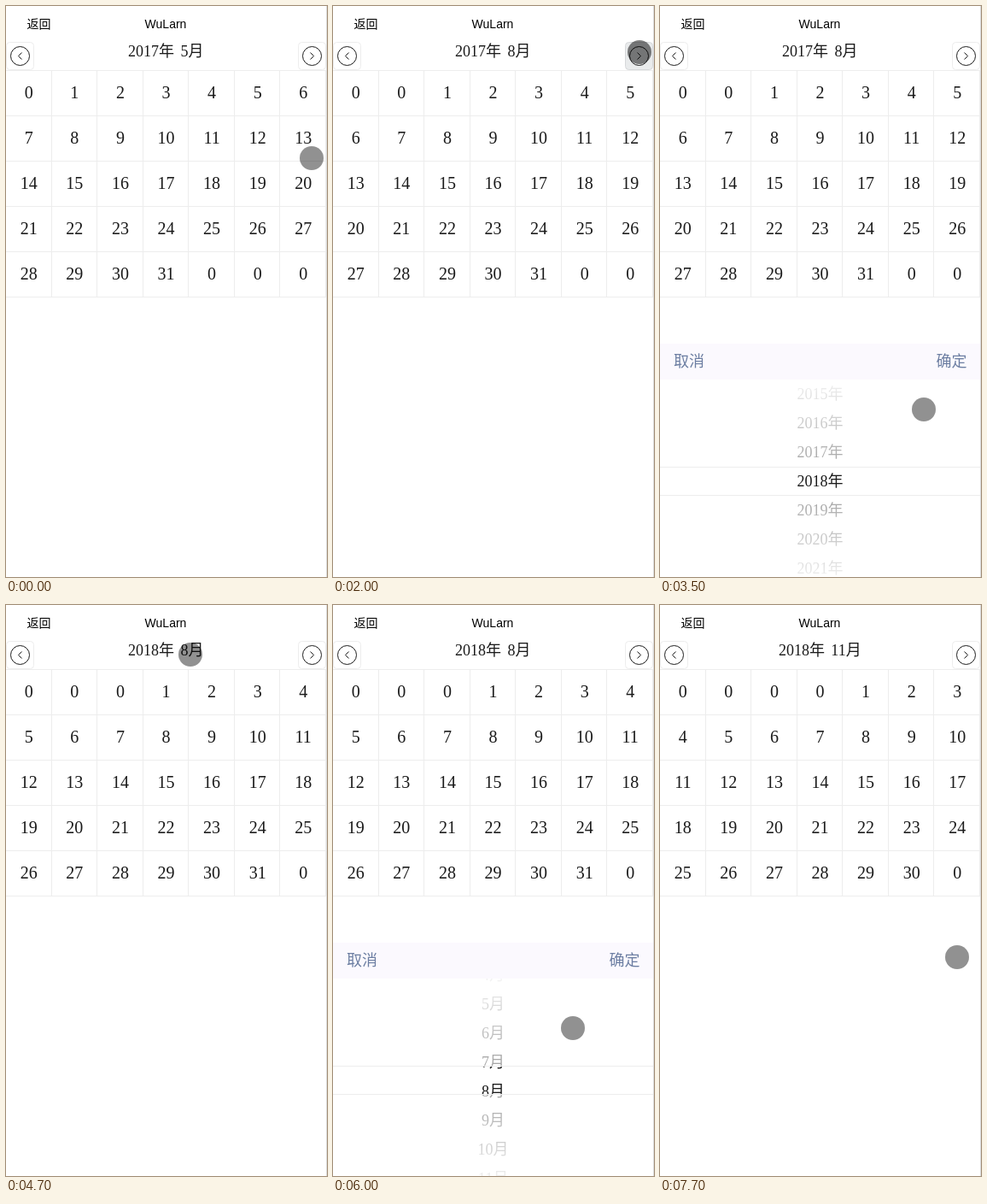
Animation, 376 px wide and 668 px high, one loop 8000 ms. Source, as an HTML page:

```html
<!DOCTYPE html>
<html lang="zh-CN">
<head>
<meta charset="utf-8">
<title>日历</title>
<style>
  html, body { margin: 0; width: 100%; height: 100%; overflow: hidden; background: #fff; }
  svg { display: block; width: 376px; height: 668px; }
  text { font-family: "Liberation Serif", "Noto Sans CJK SC", "Noto Sans CJK", serif; font-weight: 300; fill: #1a1a1a; }
  .mid { text-anchor: middle; }
  .day { font-size: 20px; }
  .label { font-size: 18px; }
  .bar { font: 14px "Liberation Sans", "Noto Sans CJK SC", "Noto Sans CJK", sans-serif; fill: #000; }
  .action { font-size: 18px; fill: #6c7ea2; }
  .grid { stroke: #ededed; fill: none; }
  .icon { stroke: #1c1c1c; fill: none; }
</style>
</head>
<body>
<svg viewBox="0 0 376 668">
  <defs>
    <linearGradient id="fade" x1="0" y1="0" x2="0" y2="1">
      <stop offset="0" stop-color="#fff" stop-opacity=".95"/>
      <stop offset="1" stop-color="#fff" stop-opacity=".6"/>
    </linearGradient>
    <clipPath id="wheelClip"><rect y="437" width="375" height="231"/></clipPath>
  </defs>
  <text class="bar" x="24.5" y="26">返回</text>
  <text class="bar mid" x="187" y="26">WuLarn</text>
  <text id="title" class="label mid" x="187.3" y="59" word-spacing="3"></text>
  <g id="buttons"></g>
  <g id="calendar"></g>
  <g id="picker">
    <rect y="395" width="375" height="273" fill="#fff"/>
    <rect y="395" width="375" height="42" fill="#fbf9fe"/>
    <text class="action" x="16" y="422">取消</text>
    <text class="action" x="323.5" y="422">确定</text>
    <g clip-path="url(#wheelClip)"><g id="wheel"></g></g>
    <rect y="437" width="375" height="102" fill="url(#fade)"/>
    <rect y="437" width="375" height="102" fill="url(#fade)" transform="matrix(1 0 0 -1 0 1112)"/>
    <path class="grid" d="M0 539.5H375M0 572.5H375"/>
  </g>
  <path d="M375.5 0V668" stroke="#dadada"/>
  <circle id="pointer" r="14"/>
</svg>
<script>
const NS = 'http://www.w3.org/2000/svg';
const LOOP = 8000, STEP = 100, ROW = 34, CELL_W = 375 / 7, CELL_H = 53, GRID_TOP = 75.5;
const $ = id => document.getElementById(id);

function set(el, attrs) {
  for (const key in attrs) el.setAttribute(key, attrs[key]);
  return el;
}

function add(parent, tag, attrs) {
  return parent.appendChild(set(document.createElementNS(NS, tag), attrs));
}

const within = (t, from, to) => t >= from && t < to;
const mix = (a, b, k) => a + (b - a) * k;
function ease(t, from, to) {
  const k = Math.min(1, Math.max(0, (t - from) / (to - from)));
  return k * k * (3 - 2 * k);
}

const home = { x: 358, y: 178 };
const moves = [
  { from: 0, to: 500, x: 365, y: 61 },
  { from: 1700, to: 2000, x: 359, y: 54 },
  { from: 2100, to: 2400, x: 176, y: 58 },
  { from: 2500, to: 2700, x: 242, y: 592 },
  { from: 2700, to: 3200, x: 246, y: 563 },
  { from: 3400, to: 3500, x: 309, y: 472 },
  { from: 3500, to: 3900, x: 345, y: 421 },
  { from: 4100, to: 4400, x: 234, y: 31 },
  { from: 4500, to: 4700, x: 216, y: 58 },
  { from: 5000, to: 5500, x: 355, y: 430 },
  { from: 5500, to: 5800, x: 275, y: 482 },
  { from: 5800, to: 6000, x: 281, y: 495 },
  { from: 6000, to: 6600, x: 310, y: 397 },
  { from: 6900, to: 7500, x: 348, y: 412 }
];
const nextClicks = [900, 1400, 1700];
const years = { open: 2500, grab: 2700, drop: 3400, settle: 100, close: 4100, value: 2017, unit: '年', max: 2030 };
const months = { open: 5100, grab: 5800, drop: 6800, settle: 400, close: 7700, value: 8, unit: '月', max: 12 };

function pointerAt(t) {
  return moves.reduce((p, m) => {
    const k = ease(t, m.from, m.to);
    return { x: mix(p.x, m.x, k), y: mix(p.y, m.y, k) };
  }, home);
}

// The wheel follows the pointer, then snaps to the nearest row.
function wheelPosition(t, { grab, drop, settle, value }) {
  const held = Math.min(Math.max(t, grab), drop);
  const dragged = value + (pointerAt(grab).y - pointerAt(held).y) / ROW;
  return mix(dragged, Math.round(dragged), ease(t, drop, drop + settle));
}

function addButton(x, dir) {
  const box = add($('buttons'), 'rect', { x: x + .5, y: 42.5, width: 32, height: 32, rx: 4 });
  const cx = x + 16.5;
  add($('buttons'), 'circle', { class: 'icon', cx, cy: 58.5, r: 11 });
  add($('buttons'), 'path', { class: 'icon', d: `M${cx - dir * 2} 54.5l${dir * 4} 4l${-dir * 4} 4` });
  return box;
}

function paintButton(box, hover) {
  set(box, { fill: hover ? '#e9ebec' : '#fff', stroke: hover ? '#d6d8da' : '#ededed' });
}

paintButton(addButton(0, -1), false);
const nextButton = addButton(342, 1);
const gridLines = add($('calendar'), 'path', { class: 'grid' });
const cells = Array.from({ length: 42 }, (_, i) => add($('calendar'), 'text', {
  class: 'day mid',
  x: CELL_W * (i % 7 + .5),
  y: 108 + CELL_H * Math.floor(i / 7)
}));
const wheelRows = Array.from({ length: 9 }, () => add($('wheel'), 'text', { class: 'label mid', x: 187.5 }));

function drawCalendar(year, month) {
  const first = new Date(year, month - 1, 1).getDay();
  const count = new Date(year, month, 0).getDate();
  const rows = Math.ceil((first + count) / 7);
  let d = '';
  for (let r = 0; r <= rows; r++) d += `M0 ${GRID_TOP + r * CELL_H}H375`;
  for (let c = 1; c <= 7; c++) d += `M${Math.round(c * CELL_W) - .5} ${GRID_TOP}v${rows * CELL_H}`;
  set(gridLines, { d });
  cells.forEach((cell, i) => {
    const day = i - first + 1;
    cell.textContent = i >= rows * 7 ? '' : day > 0 && day <= count ? day : 0;
  });
  $('title').textContent = `${year}年 ${month}月`;
}

function drawWheel(position, { unit, max }) {
  const base = Math.round(position) - 4;
  wheelRows.forEach((row, i) => {
    const value = base + i;
    row.textContent = value >= 1 && value <= max ? value + unit : '';
    set(row, { y: Math.round(562 + (value - position) * ROW) });
  });
}

function render(time) {
  const t = Math.floor(time / STEP) * STEP;
  const chosen = picker => Math.round(wheelPosition(picker.close, picker));
  const year = t < years.close ? years.value : chosen(years);
  const month = t < months.close ? 5 + nextClicks.filter(click => click <= t).length : chosen(months);
  drawCalendar(year, month);

  const picker = [years, months].find(p => within(t, p.open, p.close));
  $('picker').style.display = picker ? '' : 'none';
  if (picker) drawWheel(wheelPosition(t, picker), picker);

  const hover = within(t, 500, 2200);
  paintButton(nextButton, hover);
  const { x, y } = pointerAt(t);
  set($('pointer'), { cx: x, cy: y, 'fill-opacity': hover ? .5 : .43 });
  $('pointer').style.display = within(t, 4300, 4500) ? 'none' : '';
}

const start = performance.now();
function tick() {
  render((performance.now() - start) % LOOP);
  requestAnimationFrame(tick);
}
tick();
</script>
</body>
</html>
```
